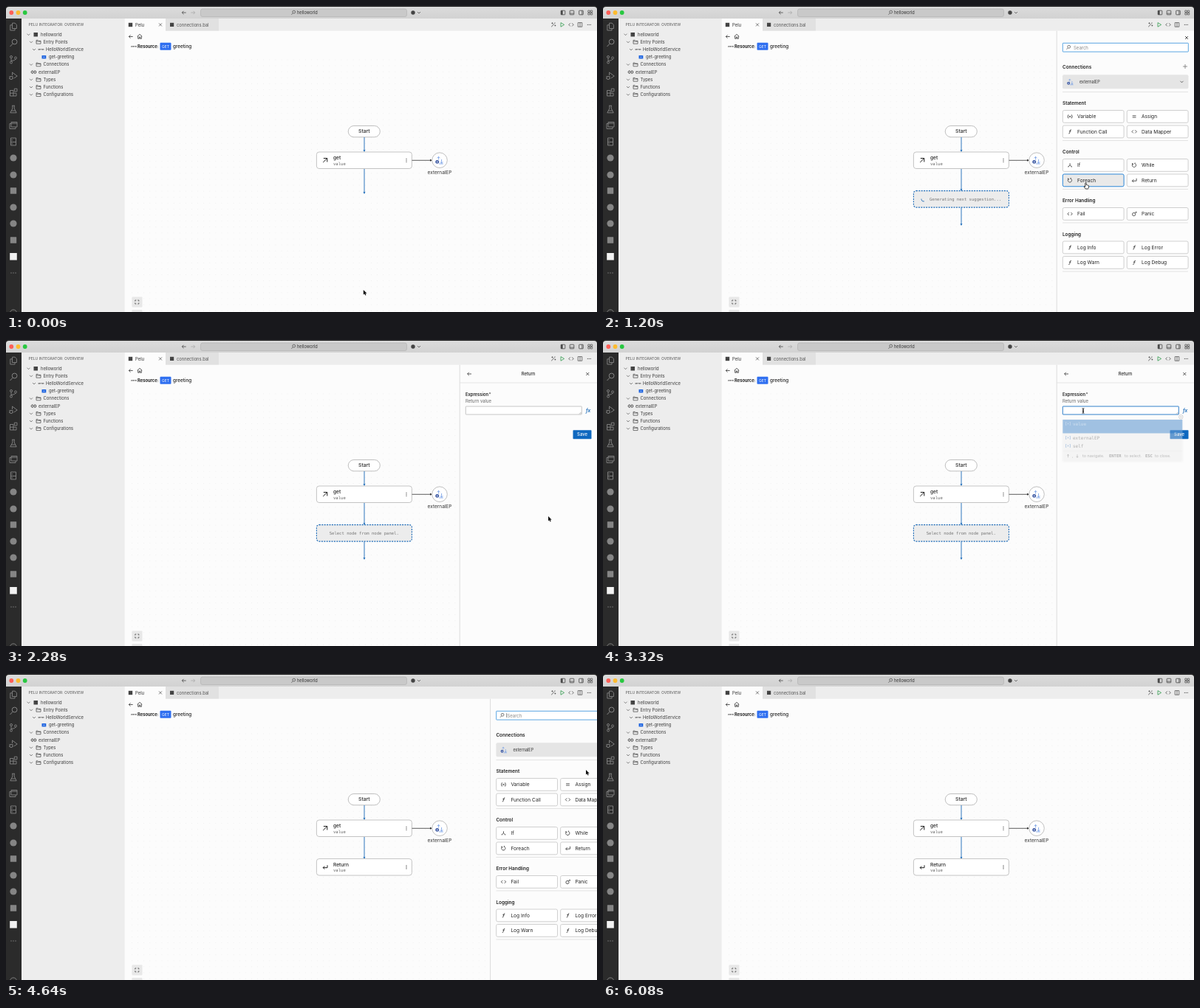
Animation of 800x415 px, one loop 6.2 s. Source, as an HTML page with a canvas:

```html
<!DOCTYPE html>
<html lang="en">
<head>
<meta charset="utf-8">
<title>Flow designer</title>
<style>
html, body { margin: 0; width: 100%; height: 100%; overflow: hidden; background: #fcfcfc; }
canvas { display: block; width: 800px; height: 415px; }
</style>
</head>
<body>
<canvas id="stage"></canvas>
<script>
const W = 800, H = 415, LOOP = 6200, STEP = 40;
const UI = 'Inter, "Open Sans", sans-serif';
const MONO = '"DejaVu Sans Mono", "Liberation Mono", monospace';
const BLUE = '#1868b7', INK = '#333', EDGE = '#c4c4c4';
const BAR = 21;
const cv = document.getElementById('stage');
const c = cv.getContext('2d');
const dpr = Math.max(1, window.devicePixelRatio || 1);
cv.width = W * dpr;
cv.height = H * dpr;

const clamp = v => Math.max(0, Math.min(1, v));
const smooth = p => p * p * (3 - 2 * p);
const easeOut = p => 1 - (1 - p) ** 3;
const span = (t, from, len) => clamp((t - from) / len);

function text(s, x, y, size, color = INK, weight = 400, font = UI, align = 'left') {
  c.font = `${weight} ${size}px ${font}`;
  c.fillStyle = color;
  c.textAlign = align;
  c.fillText(s, x, y + size * 0.35);
}

function rect(x, y, w, h, fill, stroke, r = 0, lw = 0.8) {
  c.beginPath();
  c.roundRect(x, y, w, h, r);
  if (fill) { c.fillStyle = fill; c.fill(); }
  if (stroke) { c.strokeStyle = stroke; c.lineWidth = lw; c.stroke(); }
}

function disc(x, y, r, fill, stroke, lw = 0.8) {
  c.beginPath();
  c.arc(x, y, r, 0, 7);
  if (fill) { c.fillStyle = fill; c.fill(); }
  if (stroke) { c.strokeStyle = stroke; c.lineWidth = lw; c.stroke(); }
}

function line(x1, y1, x2, y2, color, lw = 0.8) {
  c.beginPath();
  c.moveTo(x1, y1);
  c.lineTo(x2, y2);
  c.strokeStyle = color;
  c.lineWidth = lw;
  c.stroke();
}

// Path drawn around (x, y)
function icon(d, x, y, color = INK, lw = 0.8, fill) {
  c.save();
  c.translate(x, y);
  const p = new Path2D(d);
  if (fill) { c.fillStyle = fill; c.fill(p); }
  if (lw) { c.strokeStyle = color; c.lineWidth = lw; c.stroke(p); }
  c.restore();
}

const ICONS = {
  down: 'M-2-1L0 1L2-1',
  close: 'M-2-2L2 2M2-2L-2 2',
  plus: 'M-3 0H3M0-3V3',
  back: 'M2.7 0H-2.7M-.5-2.2L-2.7 0L-.5 2.2',
  fwd: 'M-2.7 0H2.7M.5-2.2L2.7 0L.5 2.2',
  lens: 'M-.6.7L-2.6 2.7M2.6-.9A1.9 1.9 0 1 1-1.2-.9A1.9 1.9 0 1 1 2.6-.9',
  home: 'M-3.2 0L0-3L3.2 0M-2.3-.6V3H-.7V.8H.7V3H2.3V-.6',
  folder: 'M-3-2.4H-.8L.2-1.4H3V2.4H-3ZM-3-.8H3',
  code: 'M-1.2-2L-3.2 0L-1.2 2M1.2-2L3.2 0L1.2 2',
  wand: 'M-2.8 2.8L1.5-1.5M-1.5-3V-1M-2.5-2H-.5M2.4.2V2M1.5 1.1H3.3M2-3V-1.8',
  play: 'M-2-2.8L2.6 0L-2 2.8Z',
  split: 'M-2.8-2.8H2.8V2.8H-2.8ZM0-2.8V2.8',
  ne: 'M-2.8 2.8L2.8-2.8M-2.2-2.8H2.8V2.2',
  ret: 'M3-2.6V.8H-2.8M-.8-1.2L-2.8.8L-.8 2.8',
  vari: 'M-1.8-2.4Q-2.8-2.4-2.6-1Q-2.6 0-3.2 0Q-2.6 0-2.6 1Q-2.8 2.4-1.8 2.4M1.8-2.4Q2.8-2.4 2.6-1Q2.6 0 3.2 0Q2.6 0 2.6 1Q2.8 2.4 1.8 2.4M-1-1L1 1M1-1L-1 1',
  func: 'M1.8-2.6Q.5-3 .3-1.2L-.4 1.8Q-.7 3-1.8 2.5M-1.2-.7H1.4',
  eq: 'M-2.4-1.1H2.4M-2.4 1.1H2.4',
  fork: 'M0-2.6V0L-2.3 2M0 0L2.3 2M-2.8 2H-1.6M1.6 2H2.8',
  loop: 'M-2-1.8A2.6 2.6 0 1 0 .4-2.5M-2.6-2.9V-1.4H-1M.4-2.5L1.6-3',
  panic: 'M1.6.6A2.1 2.1 0 1 1-2.6.6A2.1 2.1 0 1 1 1.6.6M.8-1.1L1.7-2.2H3M2.8-3.1V-1.2',
  full: 'M-2.5-1V-2.5H-1M1-2.5H2.5V-1M2.5 1V2.5H1M-1 2.5H-2.5V1'
};
const glyph = (name, x, y, color, lw) => icon(ICONS[name], x, y, color, lw);

function dotsH(x, y, color, gap = 2, r = 0.55) {
  for (const k of [-1, 0, 1]) disc(x + k * gap, y, r, color);
}

function titleBar() {
  c.fillStyle = '#1c1c1c';
  c.fillRect(0, 0, W, 6);
  const g = c.createLinearGradient(0, 0, 0, 17);
  g.addColorStop(0, '#dcdcdc');
  g.addColorStop(1, '#d2d2d2');
  rect(0, 1, W, 16, g, null, [4, 4, 0, 0]);
  ['#fe5f57', '#febc2e', '#28c840'].forEach((k, i) => disc(7.3 + i * 9.2, 9, 2.9, k));
  glyph('back', 241, 9, '#444');
  glyph('fwd', 253, 9, '#aaa');
  rect(263.5, 4, 279, 10.5, '#c9c9c9', '#b4b4b4', 2.5, 0.7);
  glyph('lens', 389, 9, '#444', 0.7);
  text('helloworld', 394, 9.2, 5.7);
  disc(551, 9, 2.7, '#444');
  glyph('down', 559, 9, '#444', 0.7);
  for (const x of [754, 766, 778.5]) rect(x - 2.8, 6.2, 5.6, 5.6, null, '#444', 0.6, 0.8);
  c.fillStyle = '#444';
  c.fillRect(751.2, 6.2, 2.4, 5.6);
  line(763.2, 10, 768.8, 10, '#444');
  line(779.8, 6.2, 779.8, 11.8, '#444');
  for (const [x, y] of [[787.8, 6], [791.2, 6], [787.8, 9.4], [791.2, 9.4]]) rect(x, y, 2.5, 2.5, null, '#444', 0.3, 0.7);
}

function activityBar() {
  c.fillStyle = '#2b2b2b';
  c.fillRect(0, 17, BAR, H - 17);
  const G = '#858585';
  icon('M-1.5-4.8H2.2L4.4-2.5V2.5H-1.5ZM-1.5-2.2H-4.2V5H2V2.5', 10, 28, G, 0.9);
  icon('M-1 1.3L-4.5 5M5-1.5A3.4 3.4 0 1 1-1.8-1.5A3.4 3.4 0 1 1 5-1.5', 10, 50, G, 1);
  disc(7, 69, 1.5, null, G, 0.9);
  disc(7, 76.5, 1.5, null, G, 0.9);
  disc(13, 70.5, 1.5, null, G, 0.9);
  icon('M-3-1.5V3M3 0Q3 2-3 2.5', 10, 72, G, 0.9);
  icon('M-1.5-1V-5L5.2 0L.8 3M-1 2.5A2 2.2 0 1 1-5 2.5A2 2.2 0 1 1-1 2.5M-5.5 0L-4.5 1M-.5 0L-1.5 1M-6 3H-5M-1 3H0', 10, 95, G, 0.9);
  icon('M-4.5-2.5H0V5H-4.5ZM-4.5 1.2H4V5H0M1.3-4.8H5V-1.2H1.3Z', 10, 117, G, 0.9);
  icon('M-2-4.8H2M-1.2-4.8V-1L-4.2 4.8H4.2L1.2-1V-4.8M-2.8 2H2.8', 10, 140, G, 0.9);
  icon('M-3-4.5H5V2H-3ZM-3-2.8H5M-3-2.5H-5V4.5H3V2', 10, 162, G, 0.9);
  icon('M-3.5-5H3.5V5H-3.5ZM-3.5.5H3.5M-1.8-3V-1.5M-1.8 2V3.5', 10, 184, G, 0.9);
  for (const y of [206, 229, 273, 295]) disc(10, y, 4.6, G);
  for (const y of [250.5, 317.5]) rect(5.8, y - 4.2, 8.4, 8.4, G, null, 0.5);
  rect(5.2, 335, 9.6, 9.6, '#f2f2f2');
  dotsH(10, 362, G, 3, 0.7);
  disc(10, 416.5, 4.6, null, G, 0.9);
}

function httpMark(x, y) {
  text('HTTP', x, y, 2.4, INK, 700, UI, 'center');
  line(x - 4, y, x - 2.9, y, INK, 0.7);
  line(x + 2.9, y, x + 4, y, INK, 0.7);
}

function sidebar() {
  c.fillStyle = '#ededed';
  c.fillRect(BAR, 17, 160.5 - BAR, H - 17);
  text('PELU INTEGRATOR: OVERVIEW', 30.5, 25.3, 5.03, '#555');
  const row = (s, x, y, chev) => {
    text(s, x, y, 5.85, '#3b3b3b');
    if (chev) glyph('down', chev, y, '#555', 0.7);
  };
  row('helloworld', 47, 38.7, 30.5);
  rect(37.5, 36, 5.5, 5.5, '#444');
  row('Entry Points', 50.5, 48.8, 34);
  row('HelloWorldService', 54, 59, 38);
  httpMark(47.5, 59);
  row('get-greeting', 58, 69.2);
  rect(48.5, 67, 5.8, 4.6, '#2468e0', null, 0.6);
  disc(51.4, 69.3, 0.7, '#cfe0ff');
  row('Connections', 50.5, 79.4, 34);
  row('externalEP', 44, 89.6);
  icon('M-.5-1.6H-1.8A1.6 1.6 0 0 0-1.8 1.6H-.5M.5-1.6H1.8A1.6 1.6 0 0 1 1.8 1.6H.5M-1.5 0H1.5', 37.5, 89.6, INK, 0.9);
  row('Types', 50.5, 99.8, 34);
  row('Functions', 50.5, 110, 34);
  row('Configurations', 50.5, 120.2, 34);
  for (const y of [48.8, 79.4, 99.8, 110, 120.2]) glyph('folder', 44, y, '#444', 0.7);
}

function tabs() {
  c.fillStyle = '#ededed';
  c.fillRect(160.5, 17, W, 16.5);
  c.fillStyle = '#fcfcfc';
  c.fillRect(160.5, 17, 55.5, 17);
  c.fillStyle = '#e1e1e1';
  c.fillRect(216, 17, 72, 16.5);
  rect(165.8, 22.8, 5.4, 5.4, '#444');
  text('Pelu', 175, 25.5, 5.9);
  glyph('close', 209, 25.4, '#444', 0.7);
  rect(222, 22.8, 5.2, 5.2, '#444');
  text('connections.bal', 231, 25.5, 5.8, '#555');
  glyph('wand', 741, 25.4, '#444', 0.8);
  glyph('play', 753, 25.4, '#2f9a4c', 0.8);
  glyph('code', 765, 25.4, '#444', 0.8);
  glyph('split', 777, 25.4, '#444', 0.7);
  dotsH(789.3, 25.4, '#444');
}

function canvasBack() {
  c.fillStyle = '#fcfcfc';
  c.fillRect(160.5, 33.5, W, H);
  c.fillStyle = '#ededed';
  for (let y = 72.5; y < H; y += 8.1)
    for (let x = 170; x < 798; x += 8.1) c.fillRect(x, y, 0.9, 0.9);
  glyph('back', 169, 41.5);
  glyph('home', 181, 41.3);
  httpMark(173, 55);
  text('Resource:', 178, 55, 5.8, '#222', 700);
  rect(208.5, 49.8, 15, 10, '#2f6ff0', null, 1);
  text('GET', 216, 55, 5, '#fff', 400, UI, 'center');
  text('greeting', 226, 55, 6.35, '#222', 500);
  rect(170.5, 394.5, 14, 14, '#e8e8e8', null, 1);
  glyph('full', 177.3, 401.5, '#444', 0.8);
  rect(170.5, 412, 14, 6, '#e8e8e8', null, 1);
}

function arrow(y1, y2, color = BLUE) {
  line(485, y1, 485, y2 - 2, color, 0.9);
  icon('M-1.5-2.8H1.5L0 0Z', 485, y2, color, 0, color);
}

function node(y, label, mark) {
  rect(420.4, y, 129, 22.5, '#fff', '#b5b5b5', 3.5, 0.8);
  glyph(mark, 432, y + 11.3, '#222', 1);
  text(label, 443, y + 7.8, 6.6, '#222', 500);
  text('value', 443, y + 15.6, 5.6, '#666', 400, MONO);
  for (const k of [-2, 0, 2]) disc(542, y + 11.3 + k, 0.6, INK);
}

function endpoint(x, y, s) {
  c.save();
  c.translate(x, y);
  c.scale(s, s);
  icon('M-1-.5V-4.6M-2.8-2.8L-1-4.6L.8-2.8M3 -1V4.2M1.2 2.4L3 4.2L4.8 2.4M-.5 5H5.2', 0, 0, '#6a97e4', 0.8);
  disc(-2.9, 2.4, 2.4, '#2c4b9b');
  icon('M-1-.6H1M-1 .8H1M0-1.4V1.4', -2.9, 2.4, '#fff', 0.5);
  c.restore();
}

function hoverTools(y) {
  disc(485, y, 4, '#fcfcfc', BLUE, 0.9);
  icon('M-2.2 0H2.2M0-2.2V2.2', 485, y, BLUE, 0.9);
  icon('M1-2.8H-3V2.4H0M-1.5-1H2.4M-1.5.8H.6M2.2 0V3.4M.5 1.7H3.9', 473, y, BLUE, 0.9);
  icon(ICONS.wand, 497, y, BLUE, 1.2);
}

function diagram(t) {
  rect(463.3, 162.5, 43, 15.3, '#fff', '#b0b0b0', 7.6, 0.8);
  text('Start', 484.8, 170, 6.7, '#222', 500, UI, 'center');
  arrow(178, 198);
  node(198, 'get', 'ne');
  line(549.5, 209.3, 575, 209.3, '#333', 0.8);
  icon('M-3-1.5L0 0L-3 1.5Z', 577, 209.3, INK, 0, INK);
  disc(587, 209.2, 10.3, '#fff', '#b0b0b0', 0.8);
  endpoint(586.6, 209, 1);
  text('externalEP', 587, 226, 6.5, INK, 400, UI, 'center');

  const hover = t >= 400 && t < 880;
  const lower = hover ? '#c9a25c' : BLUE;
  if (t < T.open) {
    arrow(221, 255, lower);
    if (hover) hoverTools(236);
    return;
  }
  arrow(221, 251, lower);
  if (hover) hoverTools(234);
  if (t >= T.saved) { node(250.6, 'Return', 'ret'); return; }
  c.setLineDash([2, 1.4]);
  rect(420.4, 250.6, 129, 22.5, '#ececec', BLUE, 3.5, 1.1);
  c.setLineDash([]);
  arrow(273.5, 298);
  if (t < T.form) {
    const turn = (t - 800) / 400 * Math.PI;
    const a = turn * 2 + 1.3;
    c.beginPath();
    c.arc(434, 262, 3, a, a + 1.5 - 0.5 * Math.cos(turn));
    c.strokeStyle = BLUE;
    c.lineWidth = 0.9;
    c.stroke();
    text('Generating next suggestion...', 442, 261.8, 5.57, '#777', 400, MONO);
  } else {
    text('Select node from node panel.', 484.8, 261.8, 5.6, '#777', 400, MONO, 'center');
  }
}

const GROUPS = [
  ['Statement', 132, [['Variable', 'vari'], ['Assign', 'eq'], ['Function Call', 'func'], ['Data Mapper', 'code']]],
  ['Control', 198, [['If', 'fork'], ['While', 'loop'], ['Foreach', 'loop'], ['Return', 'ret']]],
  ['Error Handling', 264, [['Fail', 'code'], ['Panic', 'panic']]],
  ['Logging', 309.5, [['Log Info', 'func'], ['Log Error', 'func'], ['Log Warn', 'func'], ['Log Debug', 'func']]]
];

function nodeList(t, cur) {
  glyph('close', 790, 43, INK, 0.8);
  rect(622.3, 50.3, 170, 11.8, '#fff', '#4a9de0', 0.5, 0.9);
  glyph('lens', 630, 56.2, '#444', 0.7);
  text('Search', 637, 56.4, 6, '#888');
  if (t < 1080 || t > T.saved) line(636.3, 53.2, 636.3, 59, '#333', 0.6);
  text('Connections', 622, 82.3, 6.4, '#222', 600);
  glyph('plus', 788, 82, '#666', 0.7);
  rect(622, 93.3, 170.5, 19, '#e5e5e5', null, 2);
  endpoint(632.5, 102.8, 0.8);
  text('externalEP', 645, 103, 5.5);
  glyph('down', 783.5, 102.8, '#444', 0.8);
  line(622, 116.6, 792, 116.6, '#d8d8d8', 0.7);
  for (const [name, y, items] of GROUPS) {
    text(name, 622, y, 6.4, '#222', 600);
    items.forEach(([label, mark], i) => {
      const x = i % 2 ? 709.3 : 622.3, by = y + 9.5 + (i >> 1) * 20.5;
      const on = t > 1000 && t < T.form && cur.x > x && cur.x < x + 83 && cur.y > by && cur.y < by + 17;
      rect(x, by, 82.8, 16.8, on ? '#e9e9e9' : '#fff', on ? '#2a86d8' : EDGE, 2, on ? 1 : 0.8);
      glyph(mark, x + 9.8, by + 8.4, INK, 0.8);
      text(label, x + 19.7, by + 8.5, 6.6, '#222');
    });
    const end = y + 30 + (items.length / 2 - 1) * 20.5;
    line(622, end, 792, end, '#d8d8d8', 0.7);
  }
}

function suggestions(alpha) {
  c.save();
  c.globalAlpha = alpha;
  c.shadowColor = 'rgba(0,0,0,.15)';
  c.shadowBlur = 2 * dpr;
  rect(622.3, 108, 162, 57, '#fff', null, 1);
  c.shadowBlur = 0;
  c.shadowColor = 'transparent';
  c.fillStyle = '#0a66c2';
  c.fillRect(622.3, 108, 162, 18.5);
  [['value', 113.5, '#fff'], ['externalEP', 132.5, INK], ['self', 143.5, INK]].forEach(([s, y, color], i) => {
    text(s, 636, y, 6, color, i ? 400 : 700, MONO);
    icon('M-2.2-2H-3V2H-2.2M2.2-2H3V2H2.2M-1-1L1 1M1-1L-1 1', 629.5, y, i ? '#3b78c4' : '#fff', 0.8);
  });
  line(622.3, 150.5, 784.3, 150.5, '#ddd', 0.6);
  icon('M0 2V-2M-1.3-.6L0-2L1.3-.6', 629.5, 157.3, '#555', 0.7);
  text(',', 635, 157.3, 5.2, '#555');
  icon('M0 2V-2M-1.3.6L0 2L1.3.6', 642, 157.3, '#555', 0.7);
  text('to navigate.', 649, 157.5, 5.4, '#555');
  text('ENTER', 685, 157.5, 5.5, '#444', 700, MONO);
  text('to select.', 706, 157.5, 5.4, '#555');
  text('ESC', 734, 157.5, 5.5, '#444', 700, MONO);
  text('to close.', 747, 157.5, 5.4, '#555');
  disc(782.3, 104.3, 2.8, '#eee', '#777', 0.7);
  icon('M-1-1L1 1M1-1L-1 1', 782.3, 104.3, '#777', 0.6);
  c.restore();
}

function form(t) {
  glyph('back', 627.3, 46, INK, 0.8);
  text('Return', 707, 46.3, 5.9, '#222', 500, UI, 'center');
  glyph('close', 787.3, 46, INK, 0.8);
  line(614, 58, W, 58, '#dcdcdc', 0.7);
  text('Expression', 622, 73.6, 5.8, '#222', 600);
  text('*', 653.5, 73.6, 5.8, '#444', 500);
  text('Return value', 622, 82.6, 5.9, '#666');
  const focus = t >= T.focus;
  rect(622.3, 90, 157, 11, '#fff', focus ? '#1a72c4' : '#c0c0c0', 0.5, 0.9);
  icon('M-2.4 0L0-2.4M-1 0L0-1', 778.5, 100.3, '#777', 0.5);
  text('fx', 785, 95.3, 6.6, BLUE, 'italic 600');
  if (t >= T.pick) text('value', 626, 95.6, 5.8, INK, 400, MONO);
  rect(767.5, 122.3, 25, 12, '#0f68bf', null, 0.8);
  text('Save', 780, 128.4, 5.9, '#fff', 500, UI, 'center');
  const alpha = 0.95 * span(t, T.focus + 20, 160) * (1 - span(t, T.pick, 80));
  if (alpha > 0) suggestions(alpha);
}

const T = { open: 680, form: 1960, focus: 3240, pick: 3640, saved: 4600, out: 4616 };

function panel(t, cur) {
  if (t < T.open || t > T.out + 280) return;
  const shown = easeOut(span(t, T.open, 300)) - easeOut(span(t, T.out, 300));
  c.save();
  c.translate(187 * (1 - shown), 0);
  c.fillStyle = '#fcfcfc';
  c.fillRect(614, 33.5, 190, H);
  line(614.2, 33.5, 614.2, H, '#d6d6d6', 0.8);
  if (t >= T.form && t < T.saved) form(t);
  else nodeList(t, cur);
  c.restore();
}

// Pointer moves: start, duration, end x, end y
const MOVES = [
  [60, 440, 485.5, 236.5], [840, 320, 653.5, 240], [1320, 440, 734, 239],
  [2480, 400, 650, 96], [3460, 160, 645, 114], [3700, 240, 780, 129],
  [4320, 280, 785, 130], [4780, 460, 788, -14]
];

function pointer(t) {
  let x = 483.8, y = 385;
  for (const [from, len, tx, ty] of MOVES) {
    const p = smooth(span(t, from, len));
    x += (tx - x) * p;
    y += (ty - y) * p;
  }
  return { x, y };
}

function drawPointer(t, { x, y }) {
  if (y < -10) return;
  const overInput = t > T.form && t < T.saved && x < 779 && y > 90 && y < 101;
  const overList = t > 900 && t < T.form && x > 622 && y > 141;
  const overSave = t > T.pick && t < 4320 && x > 768 && y > 122;
  const overRow = t > T.focus && t < T.pick + 80 && y > 107;
  const overPlus = t > 440 && t < 880 && x < 492;
  if (overInput) {
    icon('M-1.4-3.4Q0-3.4 0-2.4V2.4Q0 3.4-1.4 3.4M1.4-3.4Q0-3.4 0-2.4V2.4Q0 3.4 1.4 3.4M-.8 .8H.8', x, y, '#111', 0.8);
  } else if (overList || overSave || overRow || overPlus) {
    icon('M-.7 4V.2Q0-.6.7.2V2.6Q1.5 2.2 1.9 3Q2.8 2.6 3 3.4Q4 3.2 4 4.2V5.8Q4 7.6 2.8 8H-.2Q-1 7.4-2.4 5Q-2.2 4-1.4 4.6L-.7 5.2Z', x, y, '#111', 0.8, '#fff');
  } else {
    const shape = 'M0 0V6.6L1.5 5.2L2.5 7.5L3.7 7L2.7 4.8H4.7Z';
    icon(shape, x, y, '#fff', 1.1);
    icon(shape, x, y, '#111', 0, '#111');
  }
}

function draw(t) {
  c.setTransform(dpr, 0, 0, dpr, 0, 0);
  c.lineJoin = 'round';
  const cur = pointer(t);
  canvasBack();
  diagram(t);
  panel(t, cur);
  tabs();
  sidebar();
  activityBar();
  titleBar();
  drawPointer(t, cur);
}

const start = performance.now();
function tick(now) {
  const t = Math.max(0, now - start) % LOOP;
  draw(Math.floor((t + 6) / STEP) * STEP % LOOP);
  requestAnimationFrame(tick);
}
draw(0);
requestAnimationFrame(tick);
</script>
</body>
</html>
```
